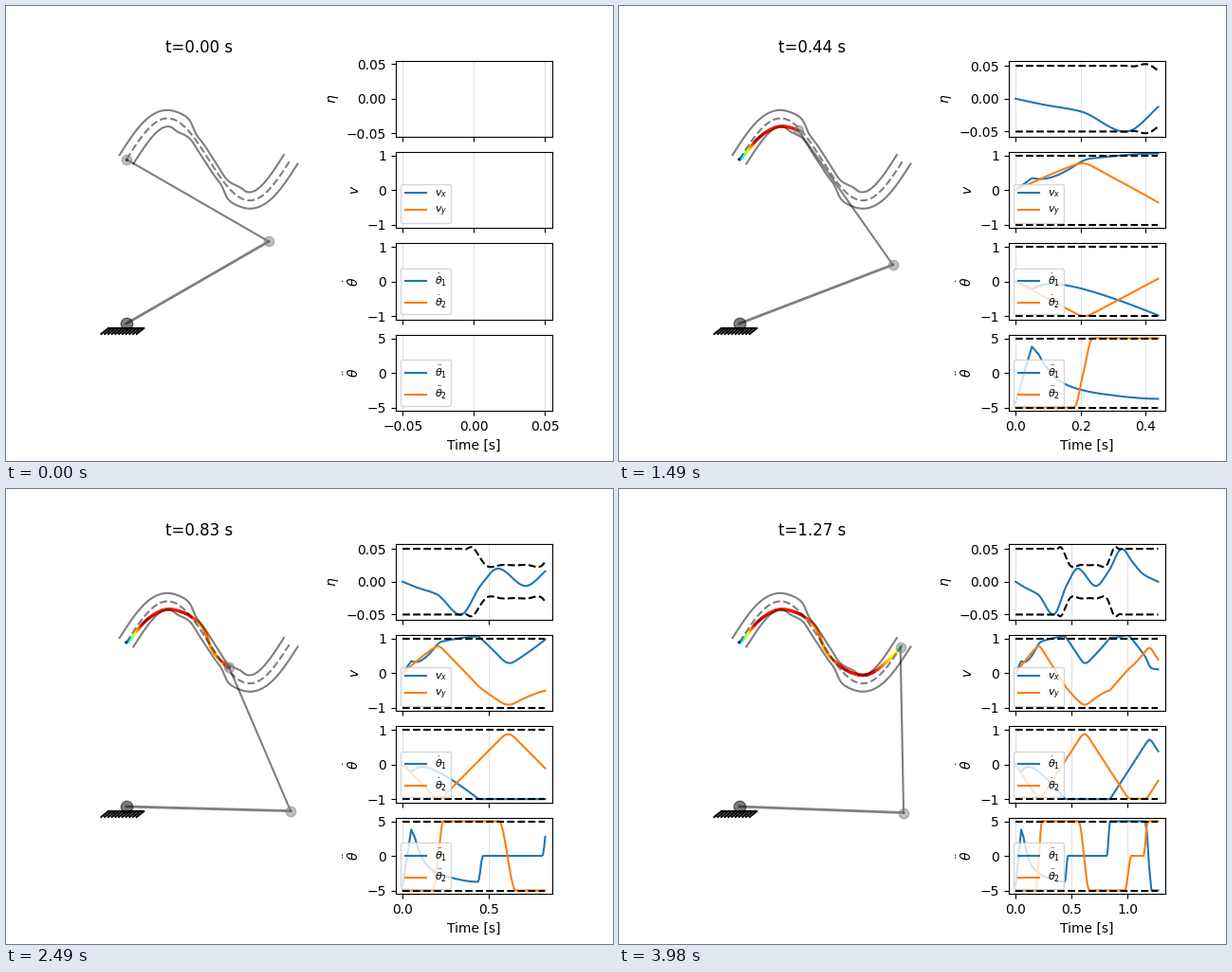
A matplotlib script for the animation above (4000 ms loop, 640x480 px).

```python
import numpy as np
import matplotlib.pyplot as plt
from matplotlib.animation import FuncAnimation

FRAMES, INTERVAL = 200, 20
STEPS = 196          # path steps shown during one loop
GRID = 199           # steps along the whole path


def hermite(x, xk, yk, mk):
    """Cubic Hermite curve through (xk, yk) with slopes mk."""
    i = np.clip(np.searchsorted(xk, x, side="right") - 1, 0, len(xk) - 2)
    h = xk[i + 1] - xk[i]
    u = (x - xk[i]) / h
    return (yk[i] * (1 + 2 * u) * (1 - u) ** 2 + yk[i + 1] * u**2 * (3 - 2 * u)
            + h * u * (1 - u) * (mk[i] * (1 - u) - mk[i + 1] * u))


def smooth(x, *keys):
    """Monotone cubic interpolation of (x, y) keys."""
    xk, yk = np.array(keys, float).T
    h = np.diff(xk)
    d = np.diff(yk) / h
    a, b = 2 * h[1:] + h[:-1], h[1:] + 2 * h[:-1]
    same = d[:-1] * d[1:] > 0
    den = np.where(same, a * d[1:] + b * d[:-1], 1)
    inner = np.where(same, (a + b) * d[:-1] * d[1:] / den, 0)
    return hermite(x, xk, yk, np.r_[d[0], inner, d[-1]])


def integrate(rate, start, dt):
    """Running sum of rate * dt, one rate per interval."""
    return np.r_[start, start + np.cumsum(rate * dt)]


def half_width(s):
    """Corridor half width: cubic spline through a narrow middle part."""
    xk = np.linspace(0, 1, 21)
    yk = np.where(abs(xk - 0.5) < 0.12, 0.025, 0.05)
    n = len(xk)
    a = 4 * np.eye(n) + np.eye(n, k=1) + np.eye(n, k=-1)
    rhs = np.zeros(n)
    rhs[1:-1] = 3 * (yk[2:] - yk[:-2]) / (xk[1] - xk[0])
    return hermite(s, xk, yk, np.linalg.solve(a, rhs))


def path(s, eta=0.0):
    """Point at phase s, shifted sideways by eta."""
    slope = 0.5 * np.pi * np.cos(2 * np.pi * s)
    norm = np.hypot(1, slope)
    return (s - eta * slope / norm,
            1 + 0.25 * np.sin(2 * np.pi * s) + eta / norm)


# progress along the path and sideways offset
k = np.arange(STEPS)
s = k / GRID
t = smooth(k, (0, 0), (1, .05), (4, .098), (12, .172), (28, .2635),
           (52, .349), (67, .403), (82, .504), (92, .588), (107, .72),
           (122, .831), (137, .912), (150, .9535), (174, 1.04),
           (188, 1.145), (195, 1.274))
eta = smooth(t, (0, 0), (.08, -.0085), (.2, -.0194), (.337, -.0502),
             (.46, -.004), (.555, .02), (.717, -.0065), (.83, .0155),
             (.95, .05), (1.04, .031), (1.14, .0115), (1.274, 0))
limit = half_width(s)
px, py = path(s, eta)

# joint accelerations switch between their bounds
a1 = smooth(t, (0, -4.3), (.05, 3.8), (.09, 1.1), (.13, -1), (.18, -2.15),
            (.26, -3), (.44, -3.75), (.468, 0), (.815, 0), (.845, 5),
            (1.16, 5), (1.215, -5), (1.274, -5))
a2 = smooth(t, (0, -5), (.18, -5), (.208, 0), (.236, 5), (.562, 5),
            (.66, -5), (.975, -5), (1.035, 0), (1.145, 0), (1.18, 5),
            (1.274, 5))

# joint rates, angles and tip velocity of two unit links
dt = np.diff(t)
w1, w2 = (np.clip(integrate(a[:-1], 0, dt), -1, 1) for a in (a1, a2))
q1 = integrate((w1[1:] + w1[:-1]) / 2, np.pi / 6, dt)
q2 = q1 + integrate((w2[1:] + w2[:-1]) / 2, 2 * np.pi / 3, dt)
ex, ey = np.cos(q1), np.sin(q1)
vx = -ey * w1 - np.sin(q2) * (w1 + w2)
vy = ex * w1 + np.cos(q2) * (w1 + w2)
speed = np.hypot(vx, vy)

fig = plt.figure(figsize=(6.4, 4.8), dpi=100)
gs = fig.add_gridspec(4, 2, width_ratios=[3, 2], wspace=0.4)

# arm view
arm = fig.add_subplot(gs[:, 0])
arm.axis("off")
UNIT, X0, Y0 = 173.2, 127.0, 335.0
arm.set_xlim((80 - X0) / UNIT, (328 - X0) / UNIT)
arm.set_ylim((Y0 - 427.2) / UNIT, (Y0 - 57.6) / UNIT)
title = arm.set_title("")

grey = dict(color="k", alpha=0.5)
full = np.linspace(0, 1, GRID + 1)
trace = arm.scatter([], [], s=2, c=[], cmap="jet", vmin=0, vmax=1.2, zorder=1)
arm.plot(*path(full), "--", **grey)
for side in (1, -1):
    arm.plot(*path(full, side * half_width(full)), **grey)

top, low = -0.029, -0.063
arm.plot([-0.11, 0.105], [top, top], "k", lw=1.5)
for x in np.linspace(-0.11, 0.105, 11):
    arm.plot([x, x - 0.043], [top, low], "k", lw=1.5)

link1, = arm.plot([], [], lw=2, **grey)
link2, = arm.plot([], [], lw=1.5, **grey)
arm.plot(0, 0, "o", ms=9, **grey)
elbow, = arm.plot([], [], "o", ms=7.5, color="gray", alpha=0.5)
tip, = arm.plot([], [], "o", ms=7.5, color="gray", alpha=0.5)

# time plots: label, curves, bound, legend names
one = np.ones(STEPS)
panels = [
    (r"$\eta$", [eta], limit, None),
    (r"$v$", [vx, vy], one, ["$v_x$", "$v_y$"]),
    (r"$\dot{\theta}$", [w1, w2], one,
     [r"$\dot{\theta}_1$", r"$\dot{\theta}_2$"]),
    (r"$\ddot{\theta}$", [a1, a2], 5 * one,
     [r"$\ddot{\theta}_1$", r"$\ddot{\theta}_2$"]),
]
axes, lines = [], []
for row, (label, curves, bound, names) in enumerate(panels):
    ax = fig.add_subplot(gs[row, 1], sharex=axes[0] if axes else None)
    axes.append(ax)
    ax.set_ylabel(label)
    ax.grid(axis="x", alpha=0.35)
    ax.tick_params(labelbottom=row == 3)
    ax.set_ylim(-1.1 * bound[0], 1.1 * bound[0])
    drawn = []
    for j, y in enumerate(curves):
        line, = ax.plot([], [], color=f"C{j}")
        lines.append((line, y))
        drawn.append(line)
    for side in (1, -1):
        line, = ax.plot([], [], "k--")
        lines.append((line, side * bound))
    if names:
        ax.legend(drawn, names, loc="lower left", fontsize=8)
axes[-1].set_xlabel("Time [s]")


def update(frame):
    n = min(int(frame * STEPS / FRAMES + 0.6), STEPS - 1)
    shown = slice(0, n + 1)
    title.set_text(f"t={t[n]:.2f} s")

    trace.set_offsets(np.column_stack([px[shown], py[shown]]))
    trace.set_array(speed[shown])
    link1.set_data([0, ex[n]], [0, ey[n]])
    link2.set_data([ex[n], px[n]], [ey[n], py[n]])
    elbow.set_data([ex[n]], [ey[n]])
    tip.set_data([px[n]], [py[n]])

    for line, y in lines:
        line.set_data(t[shown], y[shown])
    if n:
        axes[0].set_xlim(-0.05 * t[n], 1.05 * t[n])
    else:
        axes[0].set_xlim(-0.055, 0.055)
    peak = 1.1 * limit[shown].max()
    axes[0].set_ylim(-peak, peak)


anim = FuncAnimation(fig, update, frames=FRAMES, interval=INTERVAL,
                     init_func=lambda: update(0), repeat=True, repeat_delay=0)
plt.show()
```
